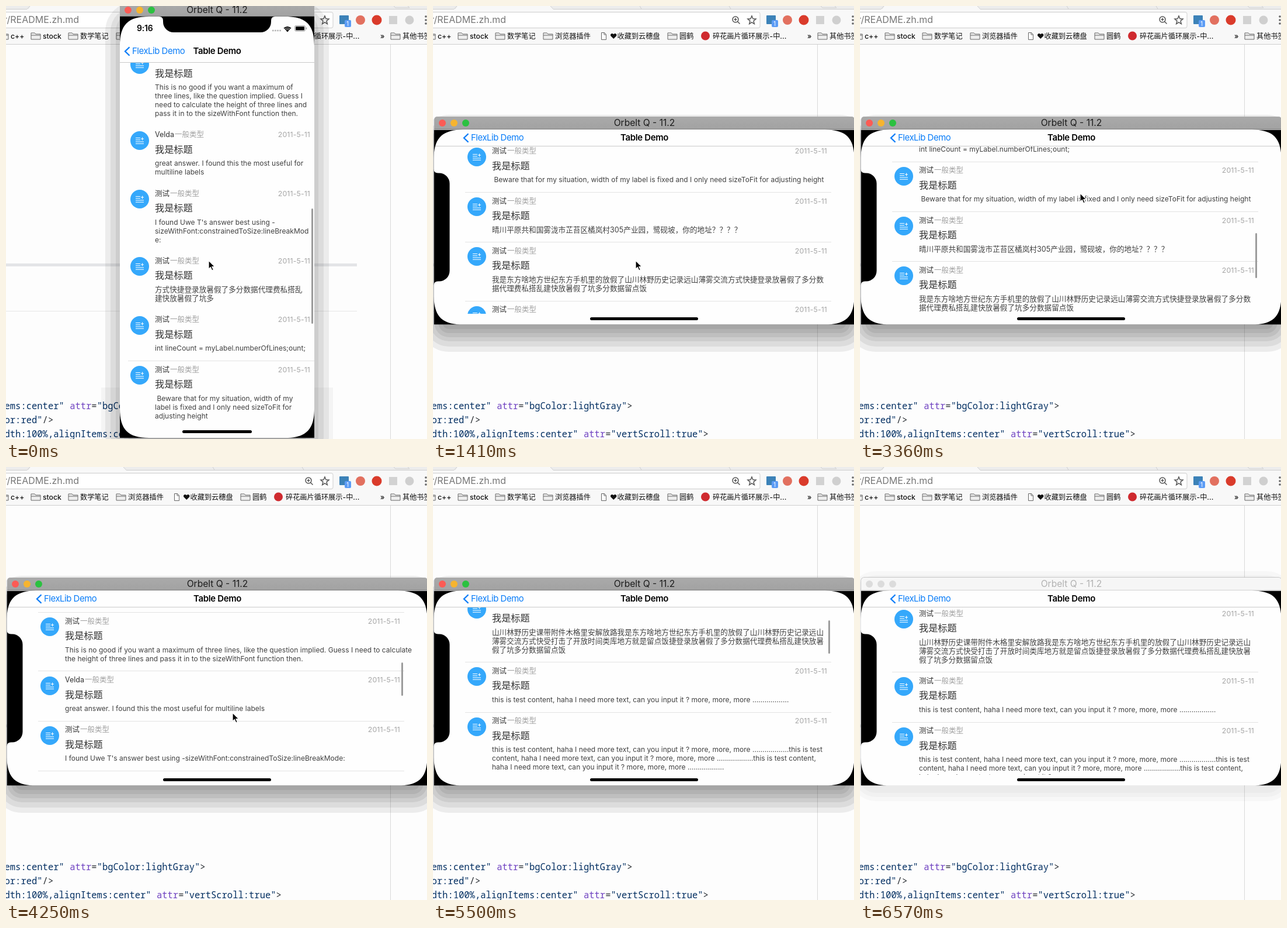
An HTML page that plays this animation: 721 by 740 pixels, repeating every 6.93 s.

```html
<!DOCTYPE html>
<html lang="zh">
<head>
<meta charset="utf-8">
<title>Table Demo</title>
<style>
html, body { margin: 0; width: 100%; height: 100%; overflow: hidden; background: #fdfdfd; }
body { font-family: Inter, "Noto Sans CJK SC", "Noto Sans CJK", "DejaVu Sans", sans-serif; }
#stage { position: absolute; left: 0; top: 0; width: 721px; height: 740px; overflow: hidden; }
#stage div, #stage svg { position: absolute; }
#page { left: 0; top: 0; }
#page .code { font: 15.5px "Noto Sans Mono", "DejaVu Sans Mono", monospace; fill: #24292e; white-space: pre; }
.code .str { fill: #032f62; }
.code .attr { fill: #6f42c1; }

.window::before { content: ""; position: absolute; inset: 0; border-radius: 25px;
  box-shadow: 0 22px 0 25px #0001, 0 22px 0 16px #0001, 0 22px 0 7px #0001,
  0 22px #0001, 0 22px 0 -7px #0001, 0 22px 0 -14px #0001; }
.titlebar { left: 0; right: 0; top: 0; height: 21px; border-radius: 5px 5px 0 0; border-bottom: 1px solid #828282;
  background: linear-gradient(#aaa, #a2a2a2); font-size: 15.6px; line-height: 22px; text-align: center; color: #1c1c1c; }
.light { top: 5px; width: 12px; height: 12px; border-radius: 50%; }
.inactive::before { box-shadow: 0 8px 0 19px #00000006, 0 8px 0 12px #00000006, 0 8px 0 5px #00000006; }
.inactive .titlebar { background: #f6f6f6; border-color: #d2d2d2; color: #b2b2b2; box-shadow: 0 0 0 .7px #bbb; }
.inactive .light { background: #dcdcdc !important; }

#device { left: 195px; top: 18px; width: 333px; height: 720px; }
#frame { left: 0; top: 0; }
.screen { background: #fefefe; overflow: hidden; }
#portrait { left: 0; top: 0; width: 333px; height: 720px; }
#landscape { left: -193px; top: 193px; width: 720px; height: 333px; }
.nav { left: 0; right: 0; border-bottom: 1px solid #c9c9c9; white-space: pre; font-size: 14.9px; line-height: 20px; }
.back { color: #087cf8; letter-spacing: -.45px; }
.nav .heading { left: 0; right: 0; text-align: center; font-weight: 600; letter-spacing: -.3px; color: #000; }
.viewport { left: 0; right: 0; overflow: hidden; }
.list { left: 0; top: 0; }
.row { white-space: pre; }
.row svg { left: 0; top: 8px; }
.name { left: 42.5px; top: 4.5px; font-size: 12.5px; line-height: 20px; color: #333; }
.name span { color: #a0a0a0; margin-left: 1px; }
.date { top: 4.5px; right: 0; font-size: 12.3px; line-height: 20px; letter-spacing: .15px; color: #a6a6a6; }
.head { left: 42.5px; top: 28px; font-size: 16.2px; line-height: 22px; color: #333; }
.body { left: 42.5px; top: 55.7px; font-size: 12px; line-height: 15px; letter-spacing: .02px; color: #404040; }
.body.zh { font-size: 12.63px; letter-spacing: 0; }
.sep { left: -4px; bottom: 0; height: 1px; background: #e3e3e3; }
.scrollbar { width: 2.6px; border-radius: 2px; background: #9c9c9c; }
.home { height: 4.6px; border-radius: 3px; background: #000; }
#cursor { left: 0; top: 0; }
</style>
</head>
<body>
<div id="stage">
  <svg id="page" width="721" height="740">
    <rect width="721" height="740" fill="#fdfdfd"/>
    <rect width="721" height="66" fill="#f8f8f8"/>
    <rect width="721" height="5" fill="#ececec"/>
    <path d="M38 6L42 0H202L206 6z" fill="#f8f8f8"/>
    <path d="M0 5.5H36L41 0M201 0L206 5.5H721M354 0l3 5M507 0l3 5M664 0l3 3h24l-3-3M0 65.5H721" fill="none" stroke="#cfcfcf"/>
    <rect x="-6" y="10.5" width="566" height="27" rx="3" fill="#fff" stroke="#cdcdcd"/>
    <text x="-4" y="29" font-size="16" fill="#777">r/README.zh.md</text>
    <g fill="none" stroke="#555" stroke-width="1.5">
      <path d="M521.500 26.500l4 4M515.500 23h5M518 20.500v5"/><circle cx="518" cy="23" r="5"/>
      <path d="M546 17l2 4.800 5 .4-4 3.400 1.300 5-4.300-2.700-4.300 2.700 1.300-5-4-3.400 5-.4z"/>
    </g>
    <rect x="571" y="16" width="16" height="15" rx="1" fill="#3c82b8"/>
    <rect x="580" y="24" width="11" height="12" rx="2" fill="#5c9cf5"/>
    <text x="583" y="34" font-size="10" fill="#fff">1</text>
    <circle cx="607" cy="24" r="8" fill="#e2705f"/>
    <circle cx="635" cy="24" r="8.500" fill="#da3b2b"/>
    <rect x="656" y="17" width="14" height="14" fill="#d2d2d2"/>
    <circle cx="691" cy="24" r="7.500" fill="#cfcfcf"/>
    <g fill="#666"><circle cx="719" cy="18" r="1.800"/><circle cx="719" cy="24" r="1.800"/><circle cx="719" cy="30" r="1.800"/></g>
    <g id="bookmarks" font-size="12.2" font-weight="500" fill="#111"></g>
    <path d="M658.5 66V740" stroke="#d9d9d9"/>
    <rect y="440" width="601" height="5" fill="#e4e5e7"/>
    <rect y="521" width="601" height="1" fill="#e6e6e6"/>
    <g class="code" xml:space="preserve">
      <text x="-2.500" y="689"><tspan class="str">ems:center"</tspan> <tspan class="attr">attr</tspan>=<tspan class="str">"bgColor:lightGray"</tspan>&gt;</text>
      <text x="-2.500" y="713"><tspan class="str">or:red"</tspan>/&gt;</text>
      <text x="-2.500" y="737"><tspan class="str">dth:100%,alignItems:center"</tspan> <tspan class="attr">attr</tspan>=<tspan class="str">"vertScroll:true"</tspan>&gt;</text>
    </g>
    <rect id="halo" x="163" y="652" width="397" height="88" fill="#000" opacity=".035"/>
  </svg>
  <div class="window" id="tallWindow" style="left:195px;top:-4px;width:333px;height:742px"></div>
  <div class="window" id="wideWindow" style="left:2px;top:189px;width:720px;height:355px"></div>
  <div id="device">
    <div class="screen" id="landscape"></div>
    <div class="screen" id="portrait"></div>
    <svg id="frame" width="333" height="720">
      <path fill-rule="evenodd" d="M0 0H333V720H0zM50 0H283C319 0 333 14 333 50V670C333 706 319 720 283 720H50C14 720 0 706 0 670V50C0 14 14 0 50 0z"/>
      <path d="M67 0q7 0 7 7v2a18 18 0 0 0 18 18H241a18 18 0 0 0 18-18v-2q0-7 7-7z"/>
    </svg>
  </div>
  <svg id="cursor" width="16" height="22" overflow="visible">
    <path d="M0 0V14.500L3.400 11.500 5.800 17 8.300 16 6 10.600H10.600z" stroke="#fff" stroke-width="1.200"/>
  </svg>
</div>
<script>
const $ = id => document.getElementById(id);

// Bookmark bar
const folder = x => `<path d="M${x} 46h6l2 2h8v9h-16zM${x} 50h16" fill="#eee" stroke="#666"/>`;
const label = (x, text) => `<text x="${x}" y="56">${text}</text>`;
$('bookmarks').innerHTML = [-12, 43, 107, 189, 402, 659].map(folder).join('') +
  [[8, 'c++'], [63, 'stock'], [127, '数学笔记'], [209, '浏览器插件'], [303, '❤\uFE0E收藏到云穗盘'], [422, '圆鹤'],
   [479, '碎花画片循环展示-中...'], [641, '»'], [679, '其他书签']].map(b => label(...b)).join('') +
  '<path d="M288.500 45.500h5l3 3v9h-8zM293 45.500v3.500h3" fill="#fff" stroke="#666"/><circle cx="466.500" cy="51" r="7.500" fill="#cf2a2f"/>';

// Window chrome
const lights = ['#fc5b55', '#f6b42f', '#2bc140'].map((c, i) =>
  `<div class="light" style="left:${8 + 20 * i}px;background:${c}"></div>`).join('');
for (const id of ['tallWindow', 'wideWindow'])
  $(id).innerHTML = `<div class="titlebar">Orbelt Q - 11.2${lights}</div>`;

// Table data
const CHAT = 'this is test content, haha I need more text, can you input it ? more, more, more ………………';
const LONG = ['我是东方啥地方世纪东方手机里的放假了山川林野历史记录远山薄雾交流方式快捷登录放暑假了多分数',
              '据代理费私搭乱建快放暑假了坑多分数据留点饭'];
const row = (lines, opts = {}) => ({ lines, name: '测试', sep: true, ...opts });
const wideRows = [
  row(['山川林野历史课带附件木格里安解放路我是东方啥地方世纪东方手机里的放假了山川林野历史记录远山',
       '薄雾交流方式快受打击了开放时间类库地方就是留点饭捷登录放暑假了多分数据代理费私搭乱建快放暑',
       '假了坑多分数据留点饭']),
  row([CHAT]),
  row([CHAT + 'this is test',
       'content, haha I need more text, can you input it ? more, more, more ………………this is test content,',
       'haha I need more text, can you input it ? more, more, more ………………']),
  row([CHAT]),
  row(['This is no good if you want a maximum of three lines, like the question implied. Guess I need to calculate',
       'the height of three lines and pass it in to the sizeWithFont function then.']),
  row(['great answer. I found this the most useful for multiline labels'], { name: 'Velda' }),
  row(["I found Uwe T's answer best using -sizeWithFont:constrainedToSize:lineBreakMode:"]),
  row(['方式快捷登录放暑假了多分数据代理费私搭乱建快放暑假了坑多']),
  row(['int lineCount = myLabel.numberOfLines;ount;']),
  row([' Beware that for my situation, width of my label is fixed and I only need sizeToFit for adjusting height']),
  row(['晴川平原共和国雾泷市芷苔区橘岚村305产业园，鹭砚坡，你的地址？？？？']),
  row(LONG), row(LONG, { sep: false }), row(LONG)
];
const plain = { sep: false };
const tallRows = [
  row(['This is no good if you want a maximum of', 'three lines, like the question implied. Guess I',
       'need to calculate the height of three lines and', 'pass it in to the sizeWithFont function then.'], plain),
  row(['great answer. I found this the most useful for', 'multiline labels'], { name: 'Velda', sep: false }),
  row(["I found Uwe T's answer best using -", 'sizeWithFont:constrainedToSize:lineBreakMod', 'e:'], plain),
  row(['方式快捷登录放暑假了多分数据代理费私搭乱', '建快放暑假了坑多'], plain),
  row(['int lineCount = myLabel.numberOfLines;ount;']),
  row([' Beware that for my situation, width of my', 'label is fixed and I only need sizeToFit for', 'adjusting height'], plain)
];

const ICON = `<svg width="32" height="32"><circle cx="16" cy="16" r="16" fill="#35a8fb"/>
  <path d="M9 11.500h8M9 14.800h8M9 18h14M9 21.200h14M20.500 10.500v5M18 13h5" stroke="#fff" stroke-width="1.100"/></svg>`;

function rowsHtml(rows, left, width) {
  let top = 0;
  return rows.map(({ lines, name, sep }) => {
    const height = 70.300 + 15 * lines.length;
    const zh = /[\u4e00-\u9fff]/.test(lines[0]) ? ' zh' : '';
    const html = `<div class="row" style="left:${left}px;top:${top}px;width:${width}px;height:${height}px">${ICON}
<div class="name">${name}<span>一般类型</span></div><div class="date">2011-5-11</div><div class="head">我是标题</div>
<div class="body${zh}">${lines.join('\n')}</div>${sep ? `<div class="sep" style="width:${width + 11}px"></div>` : ''}</div>`;
    top += height;
    return html;
  }).join('');
}

const nav = (height, x, y) => `<div class="nav" style="top:0;height:${height}px">
<svg style="left:${x}px;top:${y + 2}px" width="11" height="17"><path d="M9.500 1.200L2 8.500 9.500 15.800" fill="none" stroke="#087cf8" stroke-width="2.300"/></svg>
<div class="back" style="left:${x + 14}px;top:${y}px">FlexLib Demo</div>
<div class="heading" style="top:${y}px">Table Demo</div></div>`;

$('landscape').innerHTML = `<div class="viewport" style="top:28px;height:287px">
<div class="list" id="wideList">${rowsHtml(wideRows, 56.500, 616.500)}</div></div>${nav(28, 49, 4)}
<div class="scrollbar" id="wideBar" style="left:675px"></div>
<div class="home" style="left:267px;top:321px;width:185px"></div>`;

$('portrait').innerHTML = `<div class="viewport" style="top:78px;height:642px">
<div class="list" style="top:-20.500px">${rowsHtml(tallRows, 17.500, 308.500)}</div></div>${nav(78, 7, 49)}
<div style="left:29px;top:11px;font-size:14px;line-height:18px;font-weight:600;letter-spacing:-.2px">9:16</div>
<svg style="left:258px;top:11px" width="65" height="20">
  <path d="M3 13h16" stroke="#b5b5b5" stroke-width="2.600" stroke-dasharray="2.600 1.500"/>
  <path d="M29 15.500L22.500 8.500Q29 3.500 35.500 8.500z"/>
  <path d="M23 10.700Q29 6.500 35 10.700M25 12.700Q29 9.500 33 12.700" fill="none" stroke="#fff" stroke-width=".8"/>
  <rect x="41.500" y="4.500" width="18" height="9.500" rx="2.500" fill="none" stroke="#999"/>
  <rect x="43" y="6" width="15" height="6.500" rx="1.300"/><path d="M61.500 7.500v3.500" stroke="#999" stroke-width="1.300"/>
</svg>
<div class="scrollbar" id="tallBar" style="left:328px;top:328px;height:197px"></div>
<div class="home" style="left:107px;top:707px;width:119px"></div>`;

// Motion: [step, value...] tables, linear between entries, sampled once per step
const LOOP = 6930, STEP = 177.700;
const TURN = [[1, 0], [2, .12], [3, .5], [4, .88], [5, 1]];
const DRAG = [[8, -609], [9, -645], [10, -725], [11, -785], [12, -806], [13, -810], [14, -793], [15, -790], [16, -770],
  [17, -690], [18, -620], [19, -576], [20, -545], [21, -528], [22, -470], [23, -320], [24, -152], [25, -12]];
const POINTER = [[8, 347, 435], [10, 362, 408], [11, 372, 387], [13, 381, 394], [16, 378, 295], [19, 377, 320], [21, 378, 302],
  [22, 380, 330], [24, 388, 420], [25, 400, 450], [28, 479, 612], [29, 500, 704]];

function sample(table, step) {
  const i = table.findIndex(entry => entry[0] >= step);
  if (i < 0) return table[table.length - 1].slice(1);
  if (i === 0) return table[0].slice(1);
  const [a, b] = [table[i - 1], table[i]];
  const f = (step - a[0]) / (b[0] - a[0]);
  return a.slice(1).map((v, j) => v + (b[j + 1] - v) * f);
}

// After release the list coasts to rest exponentially
const scrollAt = step => step <= 25 ? sample(DRAG, step)[0]
  : step >= 36 ? 236 : Math.round(236 - 66 * Math.exp((28 - step) * .46));

function render(step) {
  const [turn] = sample(TURN, step);
  const portrait = $('portrait'), landscape = $('landscape');
  portrait.style.opacity = 1 - turn;
  landscape.style.opacity = turn > 0 ? 1 : 0;
  portrait.style.transform = $('frame').style.transform = `rotate(${-90 * turn}deg)`;
  landscape.style.transform = turn < 1 ? `rotate(${90 * (1 - turn)}deg)` : 'none';
  $('tallWindow').hidden = turn > 0;
  $('wideWindow').hidden = turn < 1;
  $('halo').style.display = turn > 0 ? 'none' : '';
  $('wideWindow').classList.toggle('inactive', step >= 35);

  const scroll = scrollAt(step);
  $('wideList').style.transform = `translateY(${scroll - 239}px)`;

  // Estimated row heights briefly make the indicator longer
  const [ratio, length] = step > 16 && step < 23 ? [.163, 77] : [.196, 57];
  const bar = $('wideBar');
  bar.hidden = step < 9 || step > 36;
  bar.style.top = Math.min(241 + (324 - scroll) * ratio, 523 - length + 1) - 211 + 'px';
  bar.style.height = length + 'px';
  $('tallBar').hidden = step > 0;

  const [x, y] = sample(POINTER, step);
  $('cursor').style.transform = `translate(${x}px, ${y}px)`;
  $('cursor').style.display = step > 29 ? 'none' : '';
}

const start = performance.now();
function tick() {
  const time = (performance.now() - start) % LOOP;
  render(Math.min(37, Math.floor((time + 17) / STEP)));
  requestAnimationFrame(tick);
}
tick();
</script>
</body>
</html>
```
